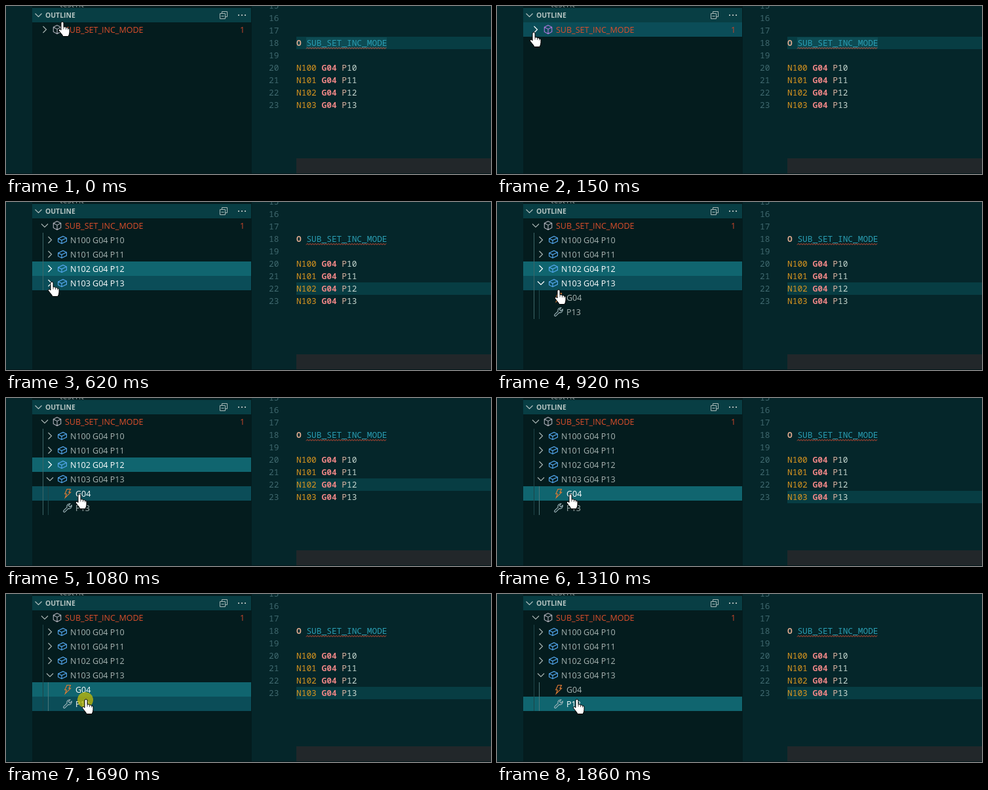
An HTML page with a canvas for the animation above (2.09 s loop, 740x257 px).

```html
<!DOCTYPE html>
<html lang="en">
<head>
<meta charset="utf-8">
<title>Outline tree</title>
<style>
html, body { margin: 0; width: 100%; height: 100%; overflow: hidden; background: #05262b; }
canvas { display: block; width: 740px; height: 257px; }
</style>
</head>
<body>
<canvas id="stage" width="740" height="257"></canvas>
<script>
const ctx = document.getElementById('stage').getContext('2d');
const LOOP = 2090, ROW = 22, TOP = 25, LEFT = 40, RIGHT = 374, LINE = 19;
const UI = '12.5px "Open Sans", "Noto Sans", sans-serif';
const MONO = '12.83px "Noto Sans Mono", "DejaVu Sans Mono", monospace';

// time, then pointer tip x and y
const moves = [
  [0, 86, 24], [80, 72, 32], [150, 56, 40], [460, 66, 96], [540, 68, 102],
  [620, 70, 122], [850, 82, 127], [920, 94, 134], [1000, 106, 141], [1080, 112, 147],
  [1390, 114, 150], [1460, 116, 154], [1540, 118, 158], [1610, 120, 160], [1690, 122, 161]
];
const presses = [[300, 400], [690, 770], [1690, 1860]];
// time, selected row, editor line
const picks = [[0, -1, 18], [540, 3, 22], [1310, 5, 23], [1860, 6, 23]];

const icons = {
  cube: new Path2D('M0-6.5L5.7-3.7V3.5L0 6.6L-5.7 3.5V-3.7ZM-5.7-3.7L0-.6L5.7-3.7M0-.6V6.6'),
  field: new Path2D('M-6.4-2L1-5.6L6.4-2.9V2.1L-1 5.7L-6.4 3ZM-6.4-2L-1 .6L6.4-2.9M-1 .6V5.7'),
  bolt: new Path2D('M-1-6.5H4.4L2-1.6H4.5L-3.6 6.4L-1.6.7H-4.2Z'),
  wrench: new Path2D('M3.8-6.2A4.1 4.1 0 0 0-.9-.9L-6 4.2A1.4 1.4 0 0 0-4 6.2L1 1.1A4.1 4.1 0 0 0 6.2-3.8L3.6-1.3L1.3-3.6Z'),
  right: new Path2D('M-2.5-5L2.5 0L-2.5 5'),
  down: new Path2D('M-5-2.5L0 2.5L5-2.5'),
  collapse: new Path2D('M-2.5-2.5V-5.5H5.5V2.5H2.5M-5.5-2.5H2.5V5.5H-5.5ZM-3.5 1.5H.5')
};
const hand = new Path2D('M-2 2Q-2 0 0 0Q2 0 2 2V8Q5 7 5.5 9Q8 8 8.5 10Q11 9.5 11 12V16Q11 19 9 22.5H1Q0 20-2 18L-5.5 13.5Q-6 11-3.5 11.5L-2 13Z');
const knuckles = new Path2D('M2 8V11.5M5.5 9V12M8.5 10V12.5');

const at = (list, t) => list.filter(k => k[0] <= t).pop();

function box(x, y, w, h, color) {
  ctx.fillStyle = color;
  ctx.fillRect(x, y, w, h);
}

function text(str, x, y, color, font = UI) {
  ctx.font = font;
  ctx.fillStyle = color;
  ctx.fillText(str, x, y);
}

function icon(name, x, y, color, width = 1.15) {
  ctx.save();
  ctx.translate(x, y);
  ctx.strokeStyle = color;
  ctx.lineWidth = width;
  ctx.stroke(icons[name]);
  ctx.restore();
}

function treeRows(open, deep) {
  const rows = [{ label: 'SUB_SET_INC_MODE', x: 90, icon: 'cube', color: '#a9aab3', open }];
  if (open) {
    for (let i = 0; i < 4; i++) {
      rows.push({ label: `N10${i} G04 P1${i}`, x: 98, icon: 'field', color: '#55a8f0', open: deep && i === 3 });
    }
  }
  if (deep) {
    rows.push({ label: 'G04', x: 106, icon: 'bolt', color: '#e37c33', leaf: true });
    rows.push({ label: 'P13', x: 106, icon: 'wrench', color: '#9fb6bb', leaf: true });
  }
  return rows;
}

function drawHeader() {
  ctx.save();
  ctx.beginPath();
  ctx.rect(LEFT, 0, RIGHT - LEFT, 3);
  ctx.clip();
  text('test1.t', 82, 2, '#93a1a1');
  ctx.restore();
  box(LEFT, 3, RIGHT - LEFT, 22, '#083e44');
  icon('down', 49.5, 14, '#b4c2c0');
  text('OUTLINE', 60, 18, '#b6c4c2', 'bold 10.4px "Open Sans", "Noto Sans", sans-serif');
  icon('collapse', 332, 14, '#a9b8b6', 1);
  for (const x of [354, 359, 364]) box(x, 13, 2, 2, '#a9b8b6');
}

function drawTree(t, selected, hover) {
  const open = t >= 400, deep = t >= 770;
  treeRows(open, deep).forEach((row, i) => {
    const y = TOP + i * ROW, mid = y + ROW / 2;
    const lit = i === selected || i === hover;
    if (lit) box(LEFT, y, RIGHT - LEFT, ROW, i === selected ? '#10656f' : '#0b4d58');
    const ink = lit ? '#ffffff' : '#a8b5b3';
    if (!row.leaf) icon(row.open ? 'down' : 'right', row.x - 31, mid, ink);
    icon(row.icon, row.x - 12, mid, i === 0 && lit ? '#a978d8' : row.color);
    text(row.label, row.x, mid + 4.5, i ? ink : '#dd4f2b');
  });
  text('1', 357, 40.5, '#c9472b');
  const inner = selected > 4;
  if (open) box(56, 47, 1, (deep ? 6 : 4) * ROW, inner ? '#1d4548' : '#3b6467');
  if (deep) box(64, 135, 1, 2 * ROW, inner ? '#4d7679' : '#1d4548');
}

function code(parts, y) {
  let x = 443;
  for (const [str, color, weight = ''] of parts) {
    text(str, x, y, color, `${weight} ${MONO}`);
    x += str.length * 7.698;
  }
}

function squiggle(x0, x1, y) {
  ctx.beginPath();
  for (let x = x0, i = 0; x <= x1; x += 2, i++) ctx.lineTo(x, y + (i % 2 ? -1 : 1));
  ctx.strokeStyle = '#dc4f35';
  ctx.lineWidth = 1;
  ctx.stroke();
}

function drawEditor(current) {
  const top = n => 47 + (n - 18) * LINE;
  box(443, top(current), 297, LINE, '#073d43');
  if (current === 18) box(458, 48, 123, 17, '#0d4b53');
  for (let n = 15; n <= 23; n++) text(n, 401, top(n) + 14, '#3f686e', MONO);
  code([['O ', '#d8a68c', 'bold'], ['SUB_SET_INC_MODE', '#2a9db2']], top(18) + 14);
  squiggle(458, 581, 64.5);
  for (let i = 0; i < 4; i++) {
    code([
      [`N10${i} `, '#d9951f'], ['G04 ', '#ea8585', 'bold'],
      ['P', '#d8b2a0'], [`1${i}`, '#c4d6cf']
    ], top(20 + i) + 14);
  }
  box(443, 233, 297, 24, '#22272a');
}

function drawPointer(x, y, pressed) {
  if (pressed) {
    ctx.beginPath();
    ctx.arc(x - 1, y + 1, 12, 0, 7);
    ctx.fillStyle = 'rgba(196,188,8,.75)';
    ctx.fill();
  }
  ctx.save();
  ctx.translate(x, y);
  ctx.fillStyle = '#fff';
  ctx.strokeStyle = '#000';
  ctx.lineWidth = 1;
  ctx.fill(hand);
  ctx.stroke(hand);
  ctx.lineWidth = 0.7;
  ctx.stroke(knuckles);
  ctx.restore();
}

function draw(t) {
  const [, x, y] = at(moves, t);
  const [, selected, line] = at(picks, t);
  const hover = Math.floor((y - TOP) / ROW);
  box(0, 0, 740, 257, '#05262a');
  box(LEFT, 0, 335, 257, '#041c1e');
  drawEditor(line);
  drawHeader();
  drawTree(t, selected, hover);
  box(0, 256, 740, 1, '#03171b');
  drawPointer(x, y, presses.some(([a, b]) => t >= a && t < b));
}

const start = performance.now();
function tick() {
  draw((performance.now() - start) % LOOP);
  requestAnimationFrame(tick);
}
tick();
</script>
</body>
</html>
```
